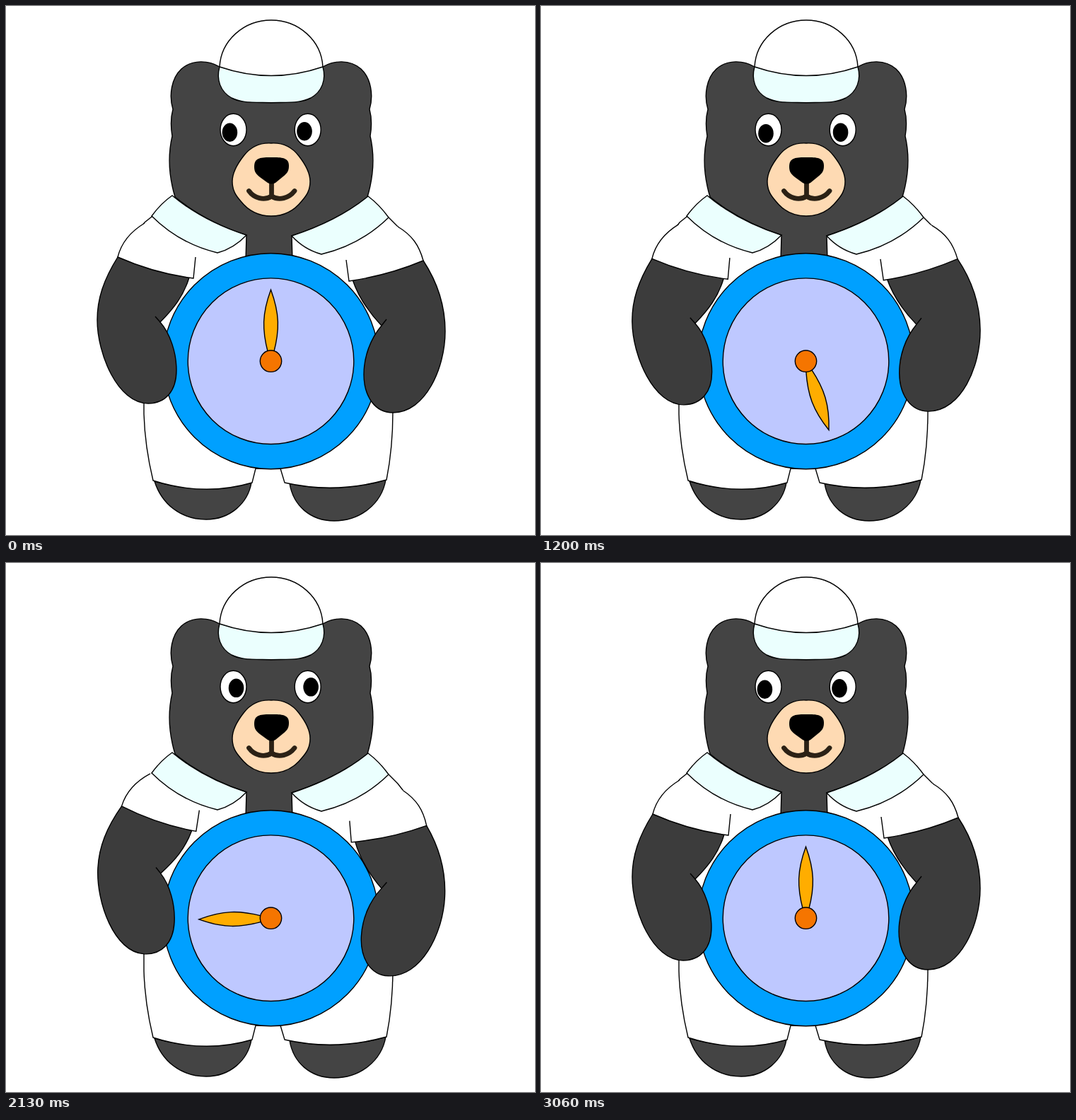
An HTML page that plays this animation: 748x748 px, repeating every 3.09 s.

```html
<!DOCTYPE html>
<html lang="en">
<head>
<meta charset="utf-8">
<title>Bear with a dial</title>
<style>
  html, body { margin: 0; width: 100%; height: 100%; overflow: hidden; background: #fff; }
  svg { display: block; width: 100vw; height: 100vh; }
  .line { stroke: #000; stroke-width: 1.4; fill: none; }
  .fur { fill: #444; }
  .arm { fill: #3c3c3c; }
  .white { fill: #fff; }
  .trim { fill: #ebfffe; }
</style>
</head>
<body>
<svg viewBox="0 0 748 748">
  <!-- feet -->
  <path class="line fur" d="M210 672C220 704 247 726 283 726C317 726 342 703 347 674Q280 692 210 672Z"/>
  <path class="line fur" d="M401 675C406 706 430 728 464 728C501 728 531 704 537 670Q470 690 401 675Z"/>

  <!-- overalls -->
  <path class="line white" d="M206 298L196 306L188.500 316L215 340L195 540V577C196 610 201 642 208 671Q280 694 348 674L353 654L388 654L394 674Q465 690 538 670C544 640 547 610 547 573L535 345L561 321L554 312L541 299Z"/>

  <!-- head and neck -->
  <path class="line fur" d="M302 86C287 77 264 75 248 89C234 102 230 126 236 146C233 157 233 172 235 184C229 210 230 240 239 270Q280 304 340 324L339 360H405L404 325Q470 303 511 270C520 240 521 210 515 184C517 172 517 157 514 146C520 126 516 102 502 89C486 75 463 77 448 86Z"/>

  <!-- hat -->
  <path class="line trim" d="M302 86C297 104 303 121 319 130C333 137 345 136 375 136.700C405 136 417 137 431 130C447 121 453 104 448 86Z"/>
  <path class="line white" d="M302 86C304 49 336 20 375 20C414 20 446 49 448 86Q375 111 302 86Z"/>

  <!-- face -->
  <ellipse class="line white" cx="321.5" cy="175" rx="18.5" ry="22.7"/>
  <ellipse class="line white" cx="426.7" cy="175" rx="18.5" ry="22.7"/>
  <g id="pupils">
    <ellipse cx="316.4" cy="178.7" rx="10.8" ry="13.2"/>
    <ellipse cx="422" cy="177.2" rx="10.8" ry="13.2"/>
  </g>
  <path class="line" style="fill:#fedab3" d="M375 194C358 193 346 199 336 212C325 226 320 237 320 248C320 261 325 268 332 276C343 290 356 297 375 297C394 297 407 290 418 276C425 268 430 261 430 248C430 237 425 226 414 212C404 199 392 193 375 194Z"/>
  <path d="M343.5 261.500C351 272 365 275.500 375.5 269C386 275.500 400 272 408 261.500M375.5 248V269" fill="none" stroke="#2b2115" stroke-width="6.8" stroke-linecap="round"/>
  <path d="M375.5 214C361 214 351 214 351 227C351 235 354 238 359 242L370 250Q375.500 253 381 250L392 241C398 236 400 233 400 226C400 214 390 214 375.5 214Z"/>

  <!-- dial -->
  <g transform="translate(374.5 502.200)">
    <circle class="line" r="152.500" style="fill:#00a0ff"/>
    <circle class="line" r="117.300" style="fill:#bec8ff"/>
    <path id="hand" class="line" style="fill:#ffad00" d="M0-101C-12.500-67-12.500-44-4-12H4C12.500-44 12.500-67 0-101Z"/>
    <circle class="line" r="15.200" style="fill:#f57500"/>
  </g>

  <!-- arms -->
  <g id="arms">
    <path class="line arm" d="M158 355C138 387 129 414 129 444C129 492 158 562 201 562C225 562 241 545 241 515C241 490 232 463 218 447C237 428 251 410 259 384Z"/>
    <path class="line" d="M211 439L218.500 447.500"/>
    <path class="white" d="M158 355C163 335 176 319 196 307L240 300L268 355L265 385Q210 378 158 355Z"/>
    <path class="line" d="M196 307C176 319 163 335 158 355Q210 378 265 385L268 355"/>

    <path class="line arm" d="M590 360C611 392 621 425 621 460C621 512 593 575 547 575C521 575 506 551 506 521C506 496 515 471 531 452C513 433 498 411 490 387Z"/>
    <path class="line" d="M538 443L530.500 452.500"/>
    <path class="white" d="M590 360C584 338 574 324 554 312L510 305L481 359L485 389Q540 381 590 360Z"/>
    <path class="line" d="M554 312C574 324 584 338 590 360Q540 381 485 389L481 359"/>
  </g>

  <!-- collar -->
  <path class="line trim" d="M235 268Q278 304 340 324Q322 343 299 349Q245 336 206 297Q219 279 235 268Z"/>
  <path class="line trim" d="M512 269Q469 304 404 325Q421 344 446 351Q501 338 541 299Q528 281 512 269Z"/>
</svg>
<script>
  const LOOP = 3090, STEP = 30, QUARTER = 765, MOVE = 635;
  const SWING = [0, 1, 0, -1, 0], TILT = -3;
  const [hand, arms, pupils] =
    ["hand", "arms", "pupils"].map(id => document.getElementById(id));

  const lerp = (a, b, e) => a + (b - a) * e;

  // cubic-bezier(.42, 0, .58, 1)
  function ease(x) {
    let lo = 0, hi = 1, s = x;
    for (let i = 0; i < 24; i++) {
      s = (lo + hi) / 2;
      const at = 1.26 * s * (1 - s) ** 2 + 1.74 * s * s * (1 - s) + s ** 3;
      if (at < x) lo = s; else hi = s;
    }
    return s * s * (3 - 2 * s);
  }

  const orbit = deg => {
    const a = deg * Math.PI / 180;
    return [4.2 + 5.1 * Math.cos(a), -2.9 + 5.1 * Math.sin(a)];
  };

  // Pupils roll along the lower rim and back, hop right, then roll over the top.
  function look(k, e) {
    if (k === 0) return orbit(lerp(145, 28, e));
    if (k === 1) return orbit(lerp(28, 145, e));
    if (k === 3) return orbit(lerp(12, -215, e));
    const [x, y] = orbit(12);
    return [x * e, y * e - 3.4 * Math.sin(Math.PI * e)];
  }

  function draw(t) {
    const k = Math.min(3, Math.floor(t / QUARTER));
    const e = ease(Math.min(1, (t - k * QUARTER) / MOVE));
    const tilt = TILT * lerp(SWING[k], SWING[k + 1], e);
    hand.setAttribute("transform", `rotate(${90 * (k + e)} 0 0.8)`);
    arms.setAttribute("transform", `rotate(${tilt} 374.5 455)`);
    pupils.setAttribute("transform", `translate(${look(k, e)})`);
  }

  const start = performance.now();
  function tick() {
    const t = (performance.now() - start) % LOOP;
    draw(Math.floor(t / STEP) * STEP);
    requestAnimationFrame(tick);
  }
  draw(0);
  requestAnimationFrame(tick);
</script>
</body>
</html>
```
